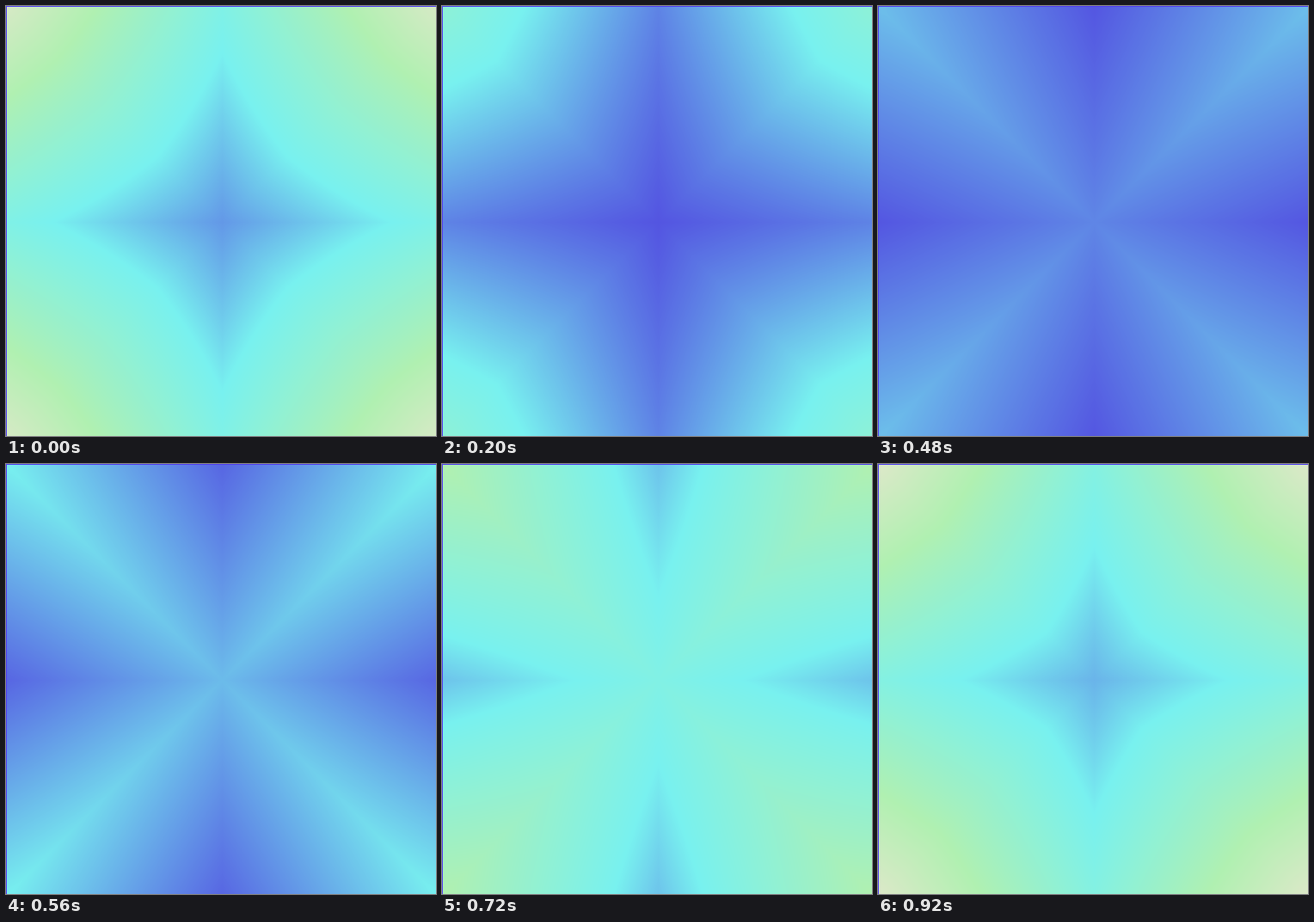
An HTML page with a canvas for the animation above (960 ms loop, 500x500 px).

```html
<!DOCTYPE html>
<html>
<head>
<meta charset="utf-8">
<style>
html, body { margin: 0; width: 100%; height: 100%; overflow: hidden; background: #5048e0; }
canvas { display: block; width: 100vw; height: 100vh; }
</style>
</head>
<body>
<canvas id="stage" width="500" height="500"></canvas>
<script>
const SIZE = 500, CENTRE = 251, LOOP = 960, STEP = 40;
const ctx = document.getElementById('stage').getContext('2d');
const image = ctx.createImageData(SIZE, SIZE);
const pixels = new Uint32Array(image.data.buffer);

// Colour ramp, one stop per unit of field height.
const stops = [[80, 71, 224], [120, 241, 239], [176, 240, 177], [238, 229, 210]];
const SHADES = 256;
const ramp = Uint32Array.from({ length: 3 * SHADES + 1 }, (_, i) => {
  const k = Math.min(2, Math.floor(i / SHADES)), f = i / SHADES - k;
  const [r, g, b] = stops[k].map((c, j) => Math.round(c + (stops[k + 1][j] - c) * f));
  return (255 << 24 | b << 16 | g << 8 | r) >>> 0;
});

// One swell per loop, highest at `peak` ms; `sharp` narrows its crest.
function swell(t, mean, size, sharp, peak) {
  const angle = (t - peak) / LOOP * 2 * Math.PI;
  return mean + size * Math.cos(angle) + sharp * Math.cos(2 * angle);
}

function draw(t) {
  const middle = swell(t, .52, .55, .1, 735);
  const side = swell(t, .55, .58, .1, 893);
  const corner = swell(t, 1.62, 1.05, .06, 895);
  const sag = swell(t, .3, .3, 0, 0);

  // The field is a mirrored wedge spanned by middle, side and corner.
  for (let y = 0; y < SIZE; y++) {
    const dy = Math.abs(y - CENTRE) / 250;
    for (let x = 0; x < SIZE; x++) {
      const dx = Math.abs(x - CENTRE) / 250;
      const far = Math.max(dx, dy), near = Math.min(dx, dy);
      const height = middle + (side - middle) * far + (corner - side) * near
        - sag * near * (1 - far);
      pixels[y * SIZE + x] = ramp[Math.round(Math.max(0, Math.min(3, height)) * SHADES)];
    }
  }
  ctx.putImageData(image, 0, 0);
  ctx.fillStyle = '#5040f0';
  ctx.fillRect(0, 0, SIZE, 1);
  ctx.fillRect(0, 0, 1, SIZE);
}

let start, shown = -1;
function tick(now) {
  start ??= now;
  const t = Math.floor((now - start) % LOOP / STEP) * STEP;
  if (t !== shown) draw(shown = t);
  requestAnimationFrame(tick);
}
requestAnimationFrame(tick);
</script>
</body>
</html>
```
